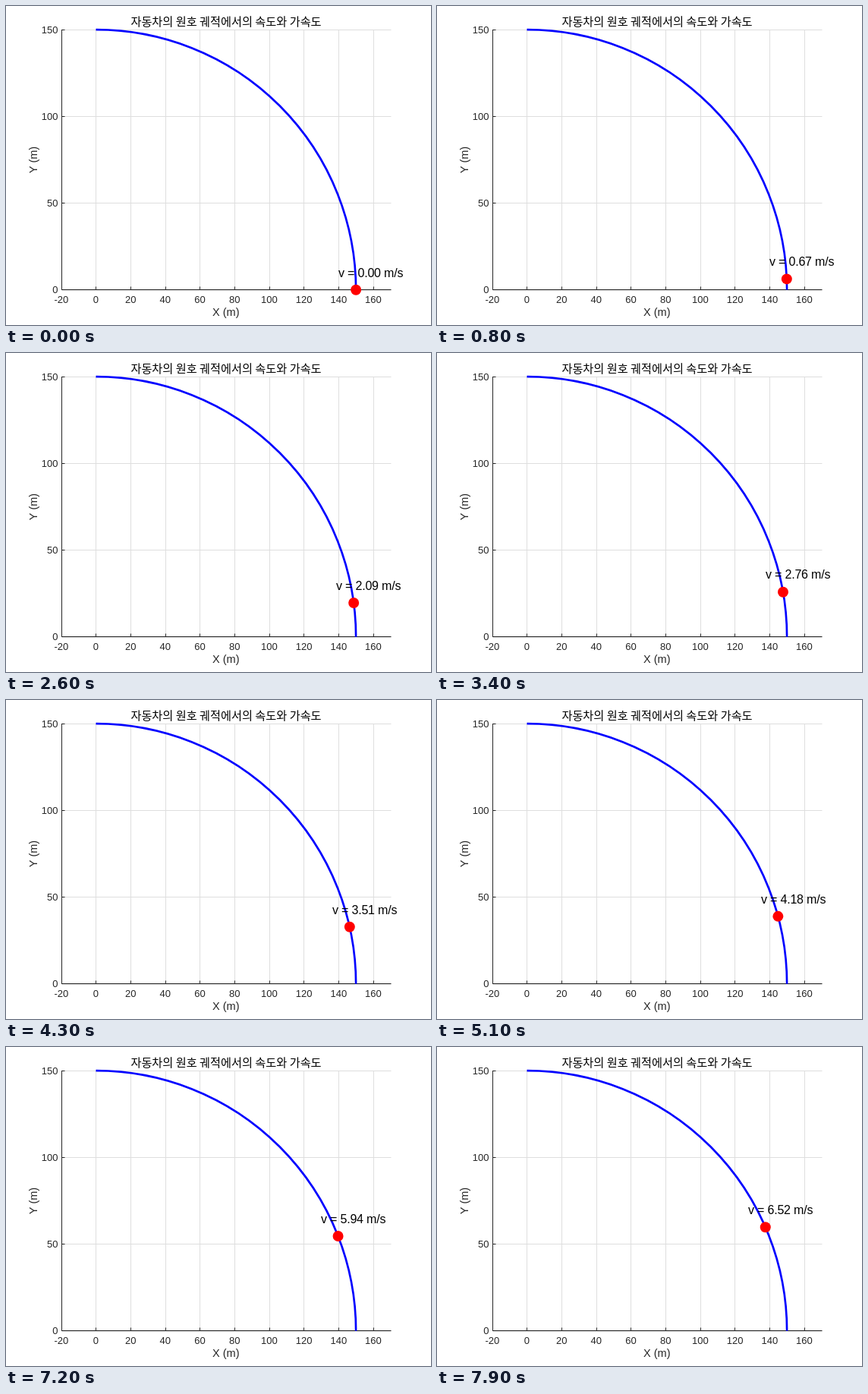
An HTML page with a canvas for the animation above (8000 ms loop, 560 by 420 pixels).

```html
<!DOCTYPE html>
<html lang="ko">
<head>
<meta charset="utf-8">
<style>
  html, body { margin: 0; width: 100%; height: 100%; overflow: hidden; background: #fff; }
  canvas { display: block; }
</style>
</head>
<body>
<canvas id="stage" width="560" height="420"></canvas>
<script>
const ctx = document.getElementById('stage').getContext('2d');
const SANS = '"Liberation Sans", Arial, sans-serif';
const HANGUL = '"Noto Sans CJK KR", "Noto Sans CJK", sans-serif';
const INK = '#262626';
const STEP = 100, STEPS = 80, HELD = 15;
const RADIUS = 150, TOP_SPEED = 25, SAMPLES = 299;

// Plot units to pixels
const SCALE = 434 / 190;
const px = x => 72.8 + (x + 20) * SCALE;
const py = y => 373.8 - y * SCALE;
const snap = v => Math.round(v - 0.2) + 0.5;

function line(x1, y1, x2, y2, color) {
  ctx.strokeStyle = color;
  ctx.lineWidth = 1;
  ctx.beginPath();
  ctx.moveTo(x1, y1);
  ctx.lineTo(x2, y2);
  ctx.stroke();
}

function text(str, x, y, font, align = 'center', color = INK, spacing = 0) {
  ctx.font = font;
  ctx.textAlign = align;
  ctx.fillStyle = color;
  ctx.letterSpacing = spacing + 'px';
  ctx.fillText(str, x, y);
}

function drawAxes() {
  const left = snap(px(-20)), right = snap(px(170));
  const top = snap(py(150)), bottom = snap(py(0)) - 0.5;
  const base = Math.floor(bottom) - 0.5;
  const grid = '#dedede', tick = 4;
  const xs = [], ys = [0, 50, 100, 150];
  for (let x = -20; x <= 160; x += 20) xs.push(x);

  for (const x of xs) line(snap(px(x)), top, snap(px(x)), base, grid);
  for (const y of ys) line(left, snap(py(y)), right, snap(py(y)), grid);

  line(left, top - 0.5, left, base + 0.5, INK);
  line(left - 0.5, base, right, base, INK);

  const font = '13px ' + SANS;
  for (const x of xs) {
    line(snap(px(x)), base, snap(px(x)), base - tick, INK);
    text(x, px(x), 391, font);
  }
  for (const y of ys) {
    const at = y ? snap(py(y)) : base;
    line(left, at, left + tick, at, INK);
    text(y, 68.5, Math.round(py(y) + 4.6), font, 'right');
  }

  const labelFont = '14.5px ' + SANS;
  text('X (m)', 289.8, 408, labelFont);
  ctx.save();
  ctx.translate(41, 202.6);
  ctx.rotate(-Math.PI / 2);
  text('Y (m)', 0, 0, labelFont);
  ctx.restore();

  text('자동차의 원호 궤적에서의 속도와 가속도', 290, 26, '300 15.2px ' + HANGUL, 'center', '#000');
}

function drawTrack() {
  ctx.strokeStyle = '#00f';
  ctx.lineWidth = 2.67;
  ctx.beginPath();
  ctx.arc(px(0), py(0), RADIUS * SCALE, -Math.PI / 2, 0);
  ctx.stroke();
}

function drawCar(k) {
  const angle = k / SAMPLES * Math.PI / 2;
  const x = RADIUS * Math.cos(angle), y = RADIUS * Math.sin(angle);
  ctx.fillStyle = '#f00';
  ctx.beginPath();
  ctx.arc(px(x), py(y), 7, 0, Math.PI * 2);
  ctx.fill();

  const speed = (TOP_SPEED * k / SAMPLES).toFixed(2);
  text(`v = ${speed} m/s`, Math.round(px(x - 10)), Math.round(py(y + 10) + 5.6),
    '16px ' + SANS, 'left', '#000', -0.2);
}

function draw(now) {
  const n = Math.floor(now / STEP + 1e-6) % STEPS;
  const k = n < HELD ? n : n - 1; // one step is held twice
  ctx.fillStyle = '#fff';
  ctx.fillRect(0, 0, 560, 420);
  drawAxes();
  drawTrack();
  drawCar(k);
}

let start;
function loop(now) {
  start ??= now;
  draw(now - start);
  requestAnimationFrame(loop);
}
draw(0);
requestAnimationFrame(loop);
</script>
</body>
</html>
```
